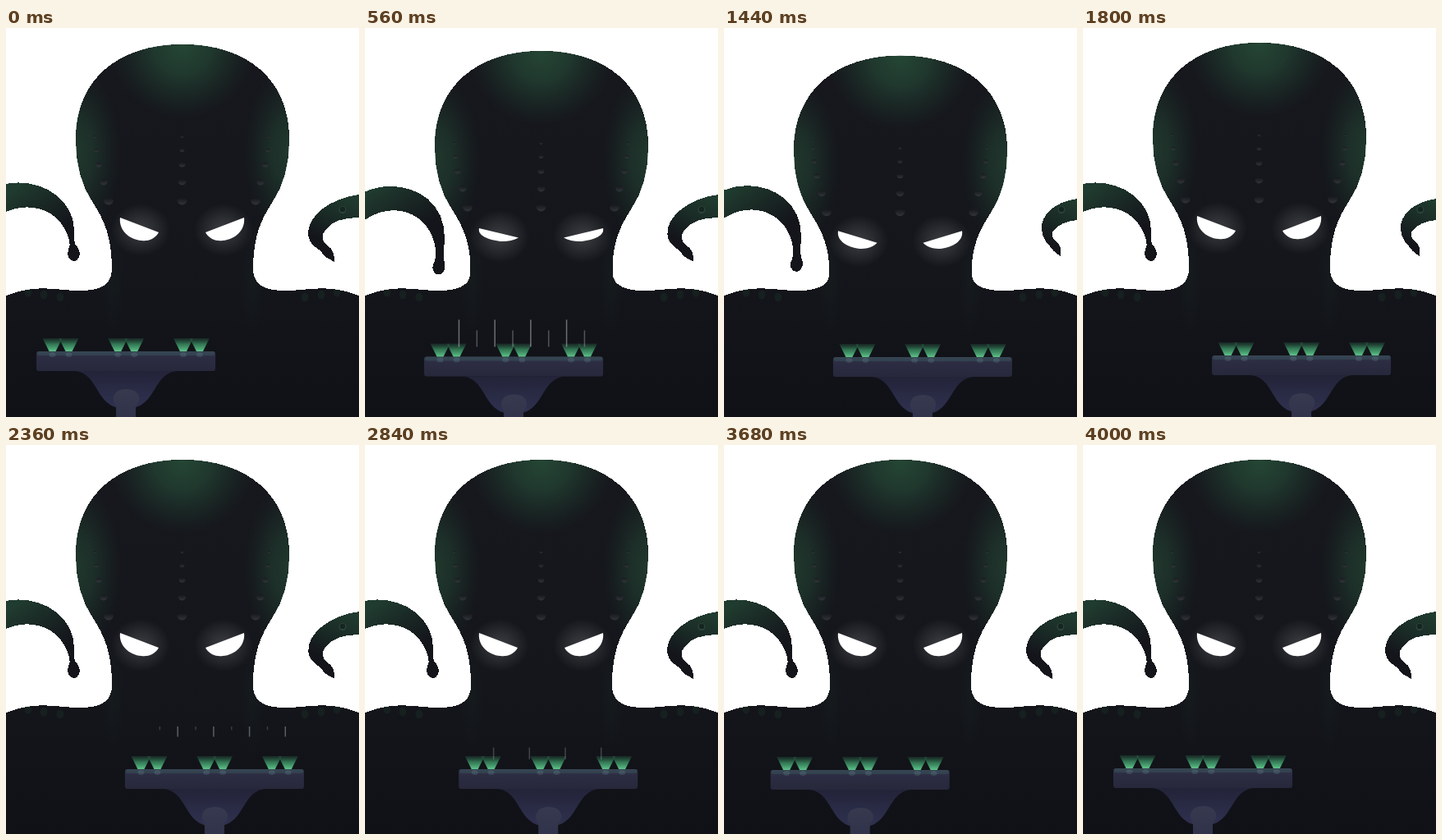
Write an HTML page that moves like this. It is 430 by 474 pixels and loops after 4040 ms.

```html
<!DOCTYPE html>
<html lang="en">
<head>
<meta charset="utf-8">
<title>Octopus and turret</title>
<style>
html, body { margin: 0; width: 100%; height: 100%; overflow: hidden; background: #fff; }
svg { display: block; width: 430px; height: 474px; }
</style>
</head>
<body>
<svg viewBox="0 0 430 474">
  <defs>
    <linearGradient id="skin" gradientUnits="userSpaceOnUse" x1="0" y1="20" x2="0" y2="474">
      <stop offset="0" stop-color="#17181d"/><stop offset=".6" stop-color="#14161b"/><stop offset="1" stop-color="#101117"/>
    </linearGradient>
    <radialGradient id="green">
      <stop offset="0" stop-color="#254634"/><stop offset=".4" stop-color="#224032" stop-opacity=".8"/>
      <stop offset="1" stop-color="#1c352b" stop-opacity="0"/>
    </radialGradient>
    <radialGradient id="glow">
      <stop offset="0" stop-color="#fff" stop-opacity=".17"/><stop offset=".5" stop-color="#fff" stop-opacity=".09"/>
      <stop offset="1" stop-color="#fff" stop-opacity="0"/>
    </radialGradient>
    <linearGradient id="sucker" x2="0" y2="1">
      <stop offset="0" stop-color="#15161b"/><stop offset="1" stop-color="#383b40"/>
    </linearGradient>
    <linearGradient id="armL" gradientUnits="userSpaceOnUse" x1="20" y1="190" x2="60" y2="250">
      <stop offset="0" stop-color="#203b2f"/><stop offset=".45" stop-color="#1a2925"/><stop offset="1" stop-color="#14151b"/>
    </linearGradient>
    <linearGradient id="armR" gradientUnits="userSpaceOnUse" x1="420" y1="205" x2="394" y2="262">
      <stop offset="0" stop-color="#203b2f"/><stop offset=".5" stop-color="#1a2b26"/><stop offset="1" stop-color="#14151b"/>
    </linearGradient>
    <linearGradient id="slab" x2="0" y2="1">
      <stop offset="0" stop-color="#34384c"/><stop offset=".3" stop-color="#2c2d43"/><stop offset="1" stop-color="#27283b"/>
    </linearGradient>
    <linearGradient id="bowl" x2="0" y2="1">
      <stop offset="0" stop-color="#232439"/><stop offset="1" stop-color="#303150"/>
    </linearGradient>
    <linearGradient id="stem" x2="0" y2="1">
      <stop offset="0" stop-color="#37394f"/><stop offset="1" stop-color="#2d2f47"/>
    </linearGradient>
    <linearGradient id="beam" x2="0" y2="1">
      <stop offset="0" stop-color="#2f7350" stop-opacity=".2"/><stop offset=".45" stop-color="#3d9767" stop-opacity=".75"/>
      <stop offset="1" stop-color="#5fc48a"/>
    </linearGradient>
    <clipPath id="inside"><path id="clip"/></clipPath>
  </defs>
  <path id="armLeft" fill="url(#armL)" shape-rendering="crispEdges"/>
  <path id="armRight" fill="url(#armR)" shape-rendering="crispEdges"/>
  <g id="ring"><circle r="4.5" fill="#2c463b"/><circle cy="-.6" r="3.2" fill="#16251f"/></g>
  <path id="body" fill="url(#skin)" shape-rendering="crispEdges"/>
  <g clip-path="url(#inside)">
    <g id="head">
      <circle cx="215" cy="20" r="88" fill="url(#green)"/>
      <ellipse cx="85" cy="150" rx="55" ry="105" fill="url(#green)" opacity=".72"/>
      <ellipse cx="345" cy="150" rx="55" ry="105" fill="url(#green)" opacity=".72"/>
      <g id="suckers"></g>
    </g>
    <ellipse cx="130" cy="310" rx="14" ry="65" fill="url(#green)" opacity=".1"/>
    <ellipse cx="300" cy="310" rx="14" ry="65" fill="url(#green)" opacity=".1"/>
    <g id="shoulders" fill="#1d3429"></g>
  </g>
  <g id="eyes">
    <ellipse cx="164" cy="244" rx="36" ry="32" fill="url(#glow)"/>
    <ellipse cx="265" cy="244" rx="36" ry="32" fill="url(#glow)"/>
    <path id="eyeL" fill="#fff"/>
    <path id="eyeR" fill="#fff" transform="translate(429) scale(-1 1)"/>
  </g>
  <g id="turret">
    <path d="M46 24C78 26 70 70 109 70S140 26 172 24Z" fill="url(#bowl)"/>
    <path d="M97 100V66Q93 62 94 56Q96 46 109.500 46T125 56Q126 62 121 66V100Z" fill="url(#stem)"/>
    <rect width="218" height="24" rx="3" fill="url(#slab)"/>
    <rect x="1" width="216" height="5" rx="2.500" fill="#3b5a5c" opacity=".4"/>
    <g id="beams"></g>
    <g id="shots" stroke="#d8dadd" stroke-width="1.500"></g>
  </g>
</svg>
<script>
const LOOP = 4040;
const NS = 'http://www.w3.org/2000/svg';
const $ = id => document.getElementById(id);
const clamp = v => Math.max(0, Math.min(1, v));

function add(parent, tag, attrs) {
  const el = document.createElementNS(NS, tag);
  for (const key in attrs) el.setAttribute(key, attrs[key]);
  return $(parent).appendChild(el);
}

// Smooth interpolation through [time, value] keys that never overshoots.
function track(...keys) {
  const slope = i => (keys[i + 1][1] - keys[i][1]) / (keys[i + 1][0] - keys[i][0]);
  const last = keys.length - 1;
  const tangent = keys.map((k, i) => {
    if (i === 0) return slope(0);
    if (i === last) return slope(last - 1);
    const a = slope(i - 1), b = slope(i);
    return a * b <= 0 ? 0 : 2 * a * b / (a + b);
  });
  return t => {
    if (t >= keys[last][0]) return keys[last][1];
    let i = 0;
    while (t >= keys[i + 1][0]) i++;
    const [t0, a] = keys[i], [t1, b] = keys[i + 1];
    const d = t1 - t0, s = (t - t0) / d, r = 1 - s;
    return a * (1 + 2 * s) * r * r + b * s * s * (3 - 2 * s)
      + d * s * r * (tangent[i] * r - tangent[i + 1] * s);
  };
}

const headDrop = track([0, 2], [560, 10], [1120, 28], [1200, 28], [1680, 1], [1760, 0], [LOOP, 0]);
const squint = track([0, 0], [400, 1], [1250, 1], [1650, 0], [LOOP, 0]);
const leftCurl = track([0, 0], [560, .87], [1120, 1], [1250, 1], [1760, 0], [LOOP, 0]);
const rightCurl = track([0, 0], [560, .02], [1120, .74], [1450, 1], [1800, 1], [2340, .02], [2600, 0], [LOOP, 0]);
const turretX = track([0, 37], [560, 72], [1120, 111], [1800, 157], [2000, 170], [2360, 145],
  [2800, 117], [3360, 77], [3920, 42], [4000, 37], [LOOP, 37]);
const turretY = track([0, 394], [560, 400.5], [1120, 402], [1800, 399], [2360, 395], [2800, 395],
  [3360, 398], [4000, 394], [LOOP, 394]);

// Morphs between two paths with the same commands.
function morph(from, to) {
  const target = to.match(/-?[\d.]+/g);
  return k => {
    let i = 0;
    return from.replace(/-?[\d.]+/g, n => (+n + (target[i++] - n) * k).toFixed(2));
  };
}

const leftArm = morph(
  'M0 190C38 182 82 205 83 246C83 258 82 262 87 267C93 275 88 284 83 284C77 284 73 277 76 270C80 263 76 254 72 246C62 224 32 210 0 224Z',
  'M0 201C42 181 99 201 99 256C99 270 96 278 98 287C101 297 95 303 91 303C84 303 81 294 86 287C89 279 88 268 84 257C74 228 38 209 0 235Z');
const rightArm = morph(
  'M430 203C395 207 366 230 368 252C370 266 381 268 385 274C388 280 394 281 400 285C400 276 398 268 391 265C384 260 384 252 389 246C397 235 412 231 430 231Z',
  'M430 208C402 212 386 228 387 245C388 258 394 262 397 266C400 271 404 274 410 278C411 270 410 263 404 260C399 256 398 250 402 246C408 239 418 235 430 234Z');
const eye = morph(
  'M139 229L186 247C181 256 172 258 165 257C150 256 137 244 139 229Z',
  'M139 234L187 245.500C181 249 172 250.500 165 250C150 248 137 243 139 234Z');

// The head and cheeks slide down by h, the neck gives way and the shoulders stay.
function bodyPath(h) {
  const neckX = 86 + h * .05, neckY = 292 + h * .4;
  const right = x => 215 + x, left = x => 215 - x;
  const p = (side, x, y) => `${side(x)} ${y} `;
  const r = (x, y) => p(right, x, y), l = (x, y) => p(left, x, y);
  return 'M' + r(0, 18 + h)
    + 'C' + r(79, 18 + h) + r(130, 61 + h) + r(130, 133 + h)
    + 'C' + r(130, 165 + h) + r(123, 190 + h) + r(109, 211 + h)
    + 'C' + r(96, 231 + h) + r(86, 252 + h) + r(neckX, neckY)
    + 'C' + r(86, 310) + r(95, 320) + r(125, 320)
    + 'C' + r(155, 320) + r(175, 311) + r(215, 326) + 'V474H0V326'
    + 'C' + l(175, 311) + l(155, 320) + l(125, 320)
    + 'C' + l(95, 320) + l(86, 310) + l(neckX, neckY)
    + 'C' + l(86, 252 + h) + l(96, 231 + h) + l(109, 211 + h)
    + 'C' + l(123, 190 + h) + l(130, 165 + h) + l(130, 133 + h)
    + 'C' + l(130, 61 + h) + l(79, 18 + h) + l(0, 18 + h) + 'Z';
}

[[108, 117], [108.5, 130], [110, 146], [113, 163.5], [119, 184.5], [125, 207.5]].forEach(([x, y], i) => {
  const r = 1 + i;
  for (const cx of [x, 214.5, 429 - x]) {
    if (cx === 214.5 && i === 0) continue;
    add('suckers', 'path', {
      d: `M${cx - r} ${y}Q${cx} ${y - r * .9} ${cx + r} ${y}A${r} ${r} 0 0 1 ${cx - r} ${y}Z`,
      fill: 'url(#sucker)', opacity: .8
    });
  }
});

for (const [x, y] of [[27, 322], [46, 325], [66, 328]])
  for (const cx of [x, 430 - x])
    add('shoulders', 'ellipse', { cx, cy: y, rx: 4.5, ry: 5.5, opacity: .35 });

for (let i = 0; i < 6; i++) {
  const x = 19.5 + (i >> 1) * 79.7 + (i % 2) * 20;
  add('beams', 'path', { d: `M${x - 12} -16H${x + 12}L${x + 4} 0H${x - 4}Z`, fill: 'url(#beam)' });
  add('beams', 'ellipse', { cx: x, cy: 4, rx: 4, ry: 3, fill: '#6d8f98', opacity: .25 });
}

const shots = Array.from({ length: 8 }, (_, i) => {
  const x = 42.4 + i * 21.85;
  return add('shots', 'line', { x1: x, x2: x });
});

function drawShots(t) {
  const period = 1000 / 3, first = 400 / 3, count = 10;
  shots.forEach((line, i) => {
    const n = Math.floor((t - first) / period);
    const age = t - first - n * period - (i % 2) * 37;
    const live = n >= 0 && n < count && age > 0 && age < 260;
    const tail = clamp((age - 100) / 160);
    line.setAttribute('y1', -12 - 40 * clamp(age / 114));
    line.setAttribute('y2', -12 - 40 * (1 - (1 - tail) ** 1.4));
    line.setAttribute('opacity', live ? .5 * Math.sin(Math.PI * age / 260) : 0);
  });
}

function render(t) {
  const h = headDrop(t), k = rightCurl(t);
  const body = bodyPath(h), eyeShape = eye(squint(t));
  $('body').setAttribute('d', body);
  $('clip').setAttribute('d', body);
  $('head').setAttribute('transform', `translate(0 ${h})`);
  $('eyes').setAttribute('transform', `translate(0 ${h})`);
  $('eyeL').setAttribute('d', eyeShape);
  $('eyeR').setAttribute('d', eyeShape);
  $('armLeft').setAttribute('d', leftArm(leftCurl(t)));
  $('armRight').setAttribute('d', rightArm(k));
  $('ring').setAttribute('transform', `translate(${410 + k} 221.5)`);
  $('turret').setAttribute('transform', `translate(${turretX(t)} ${turretY(t)})`);
  drawShots(t);
}

const start = performance.now();
function tick() {
  render((performance.now() - start) % LOOP);
  requestAnimationFrame(tick);
}
tick();
</script>
</body>
</html>
```
